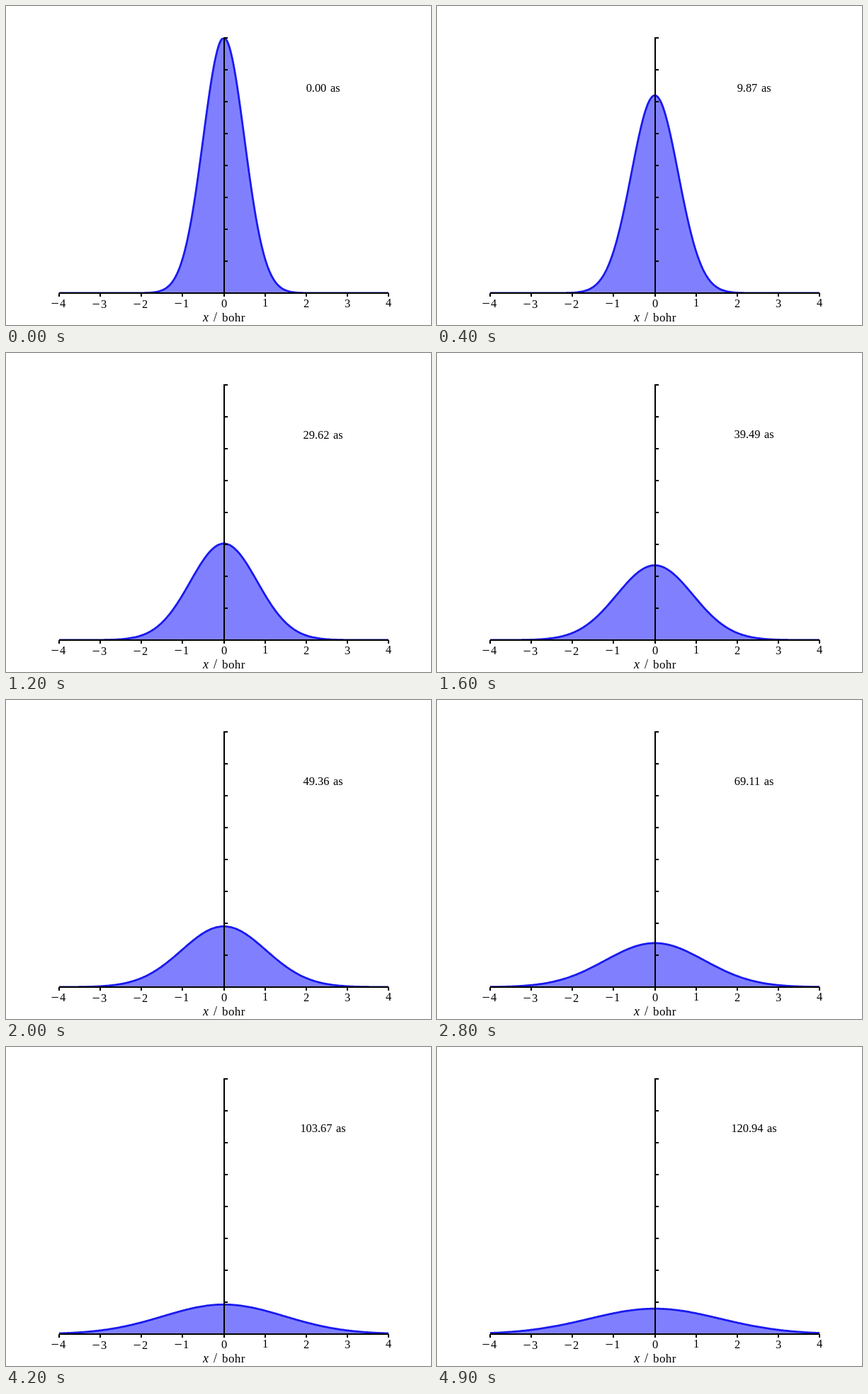
An HTML page that plays this animation: 600x450 px, repeating every 5000 ms.

```html
<!DOCTYPE html>
<html lang="en">
<head>
<meta charset="utf-8">
<title>Spreading wave packet</title>
<style>
  html, body { margin: 0; width: 100%; height: 100%; overflow: hidden; background: #fff; }
  svg { display: block; }
  text { font: 16.4px "Liberation Serif", "Times New Roman", serif; }
  .mid { text-anchor: middle; }
</style>
</head>
<body>
<svg width="600" height="450" viewBox="0 0 600 450">
  <clipPath id="plot"><rect x="75" y="45" width="465" height="360"/></clipPath>
  <g clip-path="url(#plot)">
    <path id="area" fill="#8080ff"/>
    <path id="curve" fill="none" stroke="#1a1aef" stroke-width="2.8"/>
  </g>
  <path id="axes" fill="none" stroke="#000" stroke-width="2"/>
  <g id="labels"></g>
  <text id="clock" class="mid" x="447.6" word-spacing="1.5"></text>
  <text x="278" y="445" style="font-size:18px;font-style:italic">x</text>
  <text x="293" y="445" style="font-size:18px">/</text>
  <text x="305" y="445" letter-spacing="0.4" style="font-size:17px">bohr</text>
</svg>
<script>
const $ = id => document.getElementById(id);
const BASE = 405, HEIGHT = 360, UNIT = 58.125, CENTER = 307.5;
const FRAMES = 50, FRAME_MS = 100;
const STEP = 5 / 49;           // atomic time units per frame
const ATTOSECONDS = 24.18884;  // per atomic time unit
const VARIANCE = 0.25;

// Text holding a 1 or a 4 sits one pixel higher.
const lift = s => /[14]/.test(s) ? 1 : 0;

function drawAxes() {
  let d = `M75 ${BASE}H540M308 ${BASE}V44`, labels = "";
  for (let i = 0; i < 8; i++) d += `M308 ${45 + i * 45}h5`;
  for (let k = -4; k <= 4; k++) {
    const x = Math.round(CENTER + k * UNIT), n = String(Math.abs(k));
    d += `M${x} ${BASE}v5`;
    const y = (k < 0 ? 426 : 425) - lift(n);
    if (k < 0) labels += `<text x="${x - 11.5}" y="${y + 1}" style="font-size:20px">\u2212</text>`;
    labels += `<text class="mid" x="${k < 0 ? x + 5 : x}" y="${y}">${n}</text>`;
  }
  $("axes").setAttribute("d", d);
  $("labels").innerHTML = labels;
}

function drawPacket(frame) {
  const t = frame * STEP;
  const spread = Math.hypot(1, t / (2 * VARIANCE));
  const points = [];
  for (let px = 75; px <= 540; px += 1.5) {
    const x = (px - CENTER) / UNIT;
    const y = HEIGHT / spread * Math.exp(-x * x / (2 * VARIANCE * spread));
    points.push(`${px} ${(BASE - y).toFixed(2)}`);
  }
  const line = "M" + points.join("L");
  $("curve").setAttribute("d", line);
  $("area").setAttribute("d", `${line}V${BASE}H75Z`);

  const label = (t * ATTOSECONDS).toFixed(2);
  $("clock").textContent = label + " as";
  $("clock").setAttribute("y", 121 - lift(label));
}

const start = performance.now();
let shown = -1;
function tick() {
  const frame = Math.floor((performance.now() - start) / FRAME_MS) % FRAMES;
  if (frame !== shown) drawPacket(shown = frame);
  requestAnimationFrame(tick);
}
drawAxes();
tick();
</script>
</body>
</html>
```
